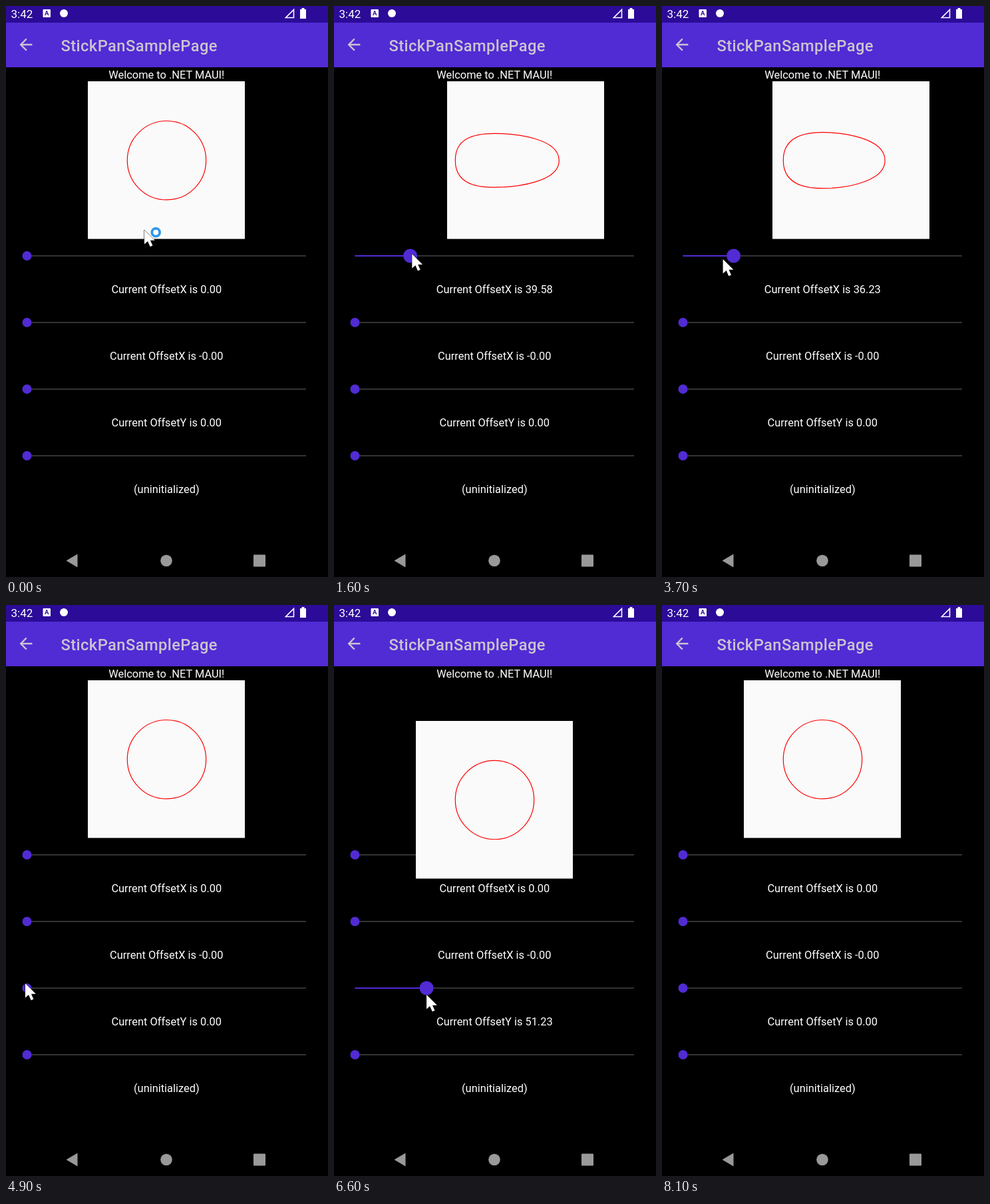
An HTML page for the animation above (8.6 s loop, 484 px wide and 857 px high).

```html
<!DOCTYPE html>
<html lang="en">
<head>
<meta charset="utf-8">
<title>StickPanSamplePage</title>
<style>
  html, body { margin: 0; width: 100%; height: 100%; overflow: hidden; background: #000; }
  svg { display: block; width: 484px; height: 857px; }
  text { font-family: Roboto, sans-serif; font-size: 16.4px; fill: #fff; }
  .mid { text-anchor: middle; }
  .title { font-size: 23.7px; font-weight: 500; letter-spacing: .42px; fill: #cac4d0; }
</style>
</head>
<body>
<svg viewBox="0 0 484 857">
  <rect width="484" height="25" fill="#2b0b98"/>
  <rect y="25" width="484" height="67" fill="#512bd4"/>

  <!-- status bar -->
  <text x="7.5" y="18" style="font-size:17px">3:42</text>
  <rect x="55.5" y="5" width="11.5" height="12" rx="1" fill="#fff"/>
  <text class="mid" x="61.2" y="14.4" style="font-size:9.5px;font-weight:700;fill:#2b0b98">A</text>
  <circle cx="87" cy="11" r="6" fill="#fff"/>
  <path d="M420.5 17.5H432.5V5.5Z" fill="none" stroke="#fff" stroke-width="1.6"/>
  <path d="M442 5h2.5v-2h4v2h2.5v14h-9z" fill="#fff"/>

  <!-- app bar -->
  <path transform="translate(15.8 43.8) scale(1.18)" fill="#cac4d0"
        d="M20 11H7.83l5.59-5.59L12 4l-8 8 8 8 1.41-1.41L7.83 13H20z"/>
  <text class="title" x="82.5" y="68">StickPanSamplePage</text>

  <text class="mid" x="241.3" y="109">Welcome to .NET MAUI!</text>
  <g id="sliders"></g>
  <rect id="panel" width="236" height="236.6" fill="#fafafa"/>
  <path id="blob" fill="none" stroke="#f00" stroke-width="1.2"/>

  <!-- navigation bar -->
  <g fill="#999">
    <path d="M90.5 832.5L107.5 822.5V842.5Z"/>
    <circle cx="241" cy="832.5" r="8.8"/>
    <rect x="372" y="823.5" width="18" height="18" rx="1"/>
  </g>

  <g id="cursor">
    <path d="M0 0V21.5L5 17 8.7 25.2 12.4 23.6 8.9 15.8H15.8Z" fill="#fff" stroke="#000" paint-order="stroke"/>
    <circle id="spinner" cx="17.2" cy="3.7" r="5.9" fill="#fff" stroke="#2f97ee" stroke-width="3.8"/>
  </g>
</svg>
<script>
const LOOP = 8600, STEP = 100, CURSOR_GONE = 8100;
const DENSITY = 1.1875, RADIUS = 59.2, SNAP = 50;
const CENTER = { x: 241.5, y: 231.7 };
const LEFT = 31.5, RIGHT = 451, PER_UNIT = 2.1;
const THUMB = 7, THUMB_PRESSED = 10.5;

// Each drag pulls a thumb up to its peak, rests, and pulls it back to zero.
const dragX = { y: 375, start: 700, reach: 2400, back: 3100, end: 4050, letGo: 4300,
  peak: 56.17, ease: 1.618, sag: 6 };
const dragY = { y: 575, start: 5050, reach: 6600, back: 6700, end: 7600, letGo: 8100,
  peak: 51.23, ease: 1.1, sag: 16 };

// Where the cursor glides between drags: [time, x, y].
const waypoints = [[0, 208, 336], [200, 23, 444], [300, 46, 386], [400, 46, 386], [600, 31, 370],
  [4200, 1, 388], [4400, 4, 390], [4900, 29, 568], [7700, 0, 588], [8000, 203, 435]];

const byId = id => document.getElementById(id);
const setAttrs = (el, attrs) => {
  for (const name in attrs) el.setAttribute(name, attrs[name]);
};
const progress = (time, from, to) => Math.min(1, Math.max(0, (time - from) / (to - from)));

function dragState(drag, time) {
  const rise = progress(time, drag.start, drag.reach);
  const fall = progress(time, drag.back, drag.end);
  const value = drag.peak * (1 - (1 - rise) ** drag.ease) * (1 - fall ** 2.254);
  const thumbX = LEFT + value * PER_UNIT;
  return {
    value,
    thumbX,
    press: progress(time, drag.start + 200, drag.start + 300) * progress(time, drag.letGo, drag.letGo - 100),
    active: time >= drag.start && time <= drag.end,
    cursor: [
      thumbX + 5.7 * (1 - rise) - 16 * Math.min(1, fall * 2),
      drag.y - 6 + drag.sag * rise + 8 * fall
    ]
  };
}

function glide(time) {
  const next = waypoints.findIndex(point => point[0] > time);
  if (next < 0) return waypoints.at(-1).slice(1);
  const [t0, x0, y0] = waypoints[next - 1], [t1, x1, y1] = waypoints[next];
  const f = progress(time, t0, t1);
  return [x0 + (x1 - x0) * f, y0 + (y1 - y0) * f];
}

const sliders = ['Current OffsetX is 0.00', 'Current OffsetX is -0.00', 'Current OffsetY is 0.00', '(uninitialized)']
  .map((label, i) => {
    const y = 375 + i * 100;
    byId('sliders').insertAdjacentHTML('beforeend', `<g>
      <path d="M${LEFT} ${y}H${RIGHT}" stroke="#333" stroke-width="2"/>
      <path class="fill" stroke="#512bd4" stroke-width="2"/>
      <circle cx="${LEFT}" cy="${y}" r="${THUMB}" fill="#512bd4"/>
      <text class="mid" x="241.3" y="${y + 56.3}">${label}</text></g>`);
    const group = byId('sliders').lastElementChild;
    const [fill, thumb, text] = ['.fill', 'circle', 'text'].map(s => group.querySelector(s));
    return ({ value, thumbX, press }, axis) => {
      setAttrs(fill, { d: `M${LEFT} ${y}H${thumbX}` });
      setAttrs(thumb, { cx: thumbX, r: THUMB + (THUMB_PRESSED - THUMB) * press });
      text.textContent = `Current Offset${axis} is ${value.toFixed(2)}`;
    };
  });

// A circle that stays anchored and stretches toward the offset until it snaps free.
function blobPath(dx, dy) {
  let { x, y } = CENTER;
  const snapped = Math.max(dx, dy) > SNAP;
  if (snapped) {
    x += dx * DENSITY;
    y += dy * DENSITY;
  }
  const stretch = snapped ? 0 : DENSITY;
  const thin = 0.4 * stretch, grow = 0.8 * stretch;
  const left = x - RADIUS + dy * thin, right = x + RADIUS + dx * grow - dy * thin;
  const top = y - RADIUS + dx * thin, bottom = y + RADIUS + dy * grow - dx * thin;
  const c = RADIUS * 0.5523;
  return `M${x} ${top}C${x + c} ${top} ${right} ${y - c} ${right} ${y}
    S${x + c} ${bottom} ${x} ${bottom}S${left} ${y + c} ${left} ${y}S${x - c} ${top} ${x} ${top}Z`;
}

function draw(now) {
  const time = Math.floor(now % LOOP / STEP) * STEP;
  const h = dragState(dragX, time), v = dragState(dragY, time);
  sliders[0](h, 'X');
  sliders[2](v, 'Y');
  setAttrs(byId('panel'), {
    x: Math.round(123.4 + h.value * DENSITY),
    y: Math.round(113.4 + v.value * DENSITY)
  });
  setAttrs(byId('blob'), { d: blobPath(h.value, v.value) });
  const position = h.active ? h.cursor : v.active ? v.cursor : glide(time);
  setAttrs(byId('cursor'), {
    transform: `translate(${position})`,
    visibility: time < CURSOR_GONE ? 'visible' : 'hidden'
  });
  byId('spinner').style.display = time < STEP ? '' : 'none';
}

const start = performance.now();
(function tick() {
  draw(performance.now() - start);
  requestAnimationFrame(tick);
})();
</script>
</body>
</html>
```
